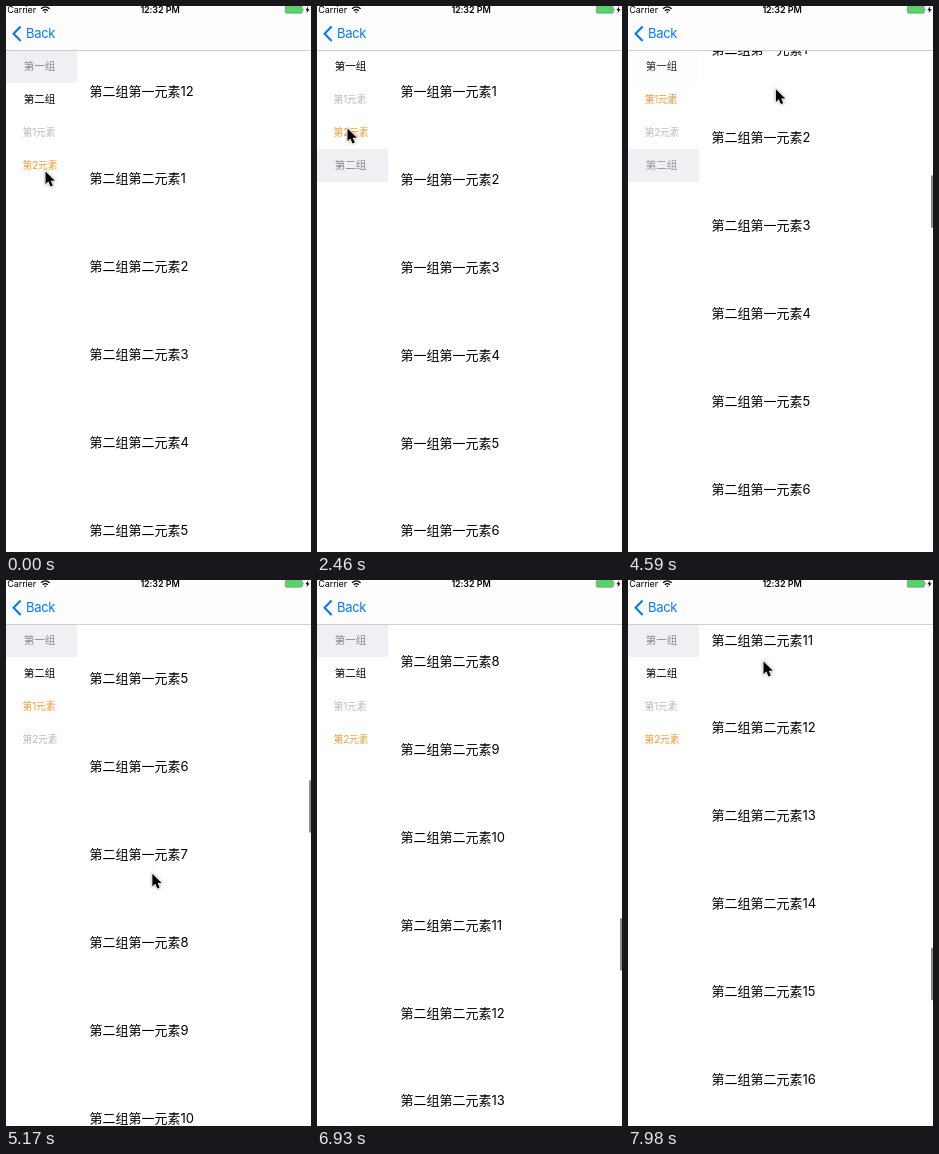
An HTML page for the animation above (8000 ms loop, 305 by 546 pixels).

```html
<!DOCTYPE html>
<html lang="zh">
<head>
<meta charset="utf-8">
<style>
html, body { margin: 0; width: 100%; height: 100%; overflow: hidden; background: #fff; }
svg { display: block; width: 305px; height: 546px; }
text { font-family: Inter, "Noto Sans CJK SC", "Noto Sans CJK", sans-serif; white-space: pre; }
#list text { font-size: 13px; }
#cursor { filter: drop-shadow(0 0.8px 0.8px rgba(0, 0, 0, 0.4)); }
</style>
</head>
<body>
<svg viewBox="0 0 305 546">
  <rect width="305" height="546" fill="#fff"/>
  <g id="list"></g>
  <rect id="bar" x="303" width="2" height="52.8" rx="1" fill="#8c8c8c"/>
  <g id="side"></g>

  <rect width="305" height="44" fill="#fdfdfd"/>
  <rect y="44" width="305" height="0.8" fill="#c4c4c6"/>
  <text x="1.3" y="7.2" font-size="9" letter-spacing="-0.1">Carrier</text>
  <g fill="none" stroke="#000" stroke-width="1.3">
    <path d="M35 2.8Q39.3-1 43.6 2.8M36.8 4.8Q39.3 2.5 41.8 4.8"/>
    <path d="M37.9 5.7h2.8L39.3 7.3z" fill="#000" stroke="none"/>
  </g>
  <text x="154" y="7.2" font-size="9" font-weight="600" text-anchor="middle" letter-spacing="-0.1">12:32 PM</text>
  <rect x="279.3" y="0.2" width="17" height="7" rx="1.3" fill="#4cd964" stroke="#777" stroke-width="0.6"/>
  <path d="M297.2 2.4q1.2 1.3 0 2.6z" fill="#555"/>
  <path d="M302.4 0.2L299.4 4.2H301.2L300.5 7.2L303.6 3.2H301.7z"/>
  <path d="M14.6 20.6L7.6 27.8L14.6 35" fill="none" stroke="#007aff" stroke-width="2.1"/>
  <text x="20" y="32.4" font-size="13" letter-spacing="-0.3" fill="#007aff">Back</text>

  <g id="cursor">
    <path d="M0.5 1.5V14.3L3.4 11.6L5.5 16.4L7.8 15.5L5.8 10.8H9.8Z" stroke="#fff" stroke-width="1.4" paint-order="stroke"/>
  </g>
</svg>
<script>
const LOOP = 8000, STEP = 1000 / 8.5, LEAD = 20;
const ROW = 87.84, TOP = 44, SLOT = 33;
const SECTIONS = [['第一组第一元素', 6], ['第一组第二元素', 7], ['第二组第一元素', 12], ['第二组第二元素', 30]];

// Times of the clicks and of the two flicks
const CLICK = [1280, 2400];
const FLICK = [{ down: 4000, up: 4240 }, { down: 6118, up: 6460 }];

// Pointer moves: start, end, x, y
const HOME = [39, 164];
const MOVES = [
  [240, 1058, 28, 63],
  [1500, 2240, 30, 121],
  [2950, 3530, 146, 184],
  [FLICK[0].down, FLICK[0].up, 148, 0],
  [4360, 5500, 145, 408],
  [5800, FLICK[1].down, 126, 391],
  [FLICK[1].down, FLICK[1].up, 132, 60],
  [FLICK[1].up, 6900, 150, 560],
  [7170, LOOP, 135, 80]
];

const $ = id => document.getElementById(id);
const lerp = (a, b, p) => a + (b - a) * p;
const progress = (t, start, length) => Math.min(1, Math.max(0, (t - start) / length));
const easeOut = p => 1 - (1 - p) ** 1.5;
const glide = (from, to, age, tau) => lerp(to, from, Math.exp(-age / tau));

function add(parent, tag, attrs, content = '') {
  const node = document.createElementNS('http://www.w3.org/2000/svg', tag);
  for (const key in attrs) node.setAttribute(key, attrs[key]);
  node.textContent = content;
  return parent.appendChild(node);
}

function pointerAt(t) {
  return MOVES.reduce(([px, py], [start, end, x, y]) => {
    const p = progress(t, start, end - start);
    return [lerp(px, x, p), lerp(py, y, p)];
  }, HOME);
}

// Clicks scroll to a section; flicks follow the pointer, then coast
function scrollAt(t, y) {
  const [a, b] = FLICK;
  if (t < CLICK[0]) return ROW * lerp(24.03, 25, progress(t, 0, STEP));
  if (t < a.down) return ROW * 6 * easeOut(progress(t, CLICK[1] + 70, 236));
  if (t < a.up) return ROW * 6 + 184 - y;
  if (t < b.down) return glide(711, 1592, t - a.up, 450);
  if (t < b.up) return 1578.4 + 391 - y;
  return glide(1909.4, 3115.9, t - b.up, 345);
}

// Section and index within it for a list row
function locate(row) {
  let s = 0;
  while (s < SECTIONS.length - 1 && row >= SECTIONS[s][1]) row -= SECTIONS[s++][1];
  return [s, row];
}

function sectionAt(t, offset) {
  if (t < CLICK[0]) return 3;
  if (t < CLICK[1]) return 0;
  if (t < FLICK[0].down) return 1;
  return locate(Math.floor(offset / ROW))[0];
}

const rows = Array.from({ length: 8 }, () => add($('list'), 'text', { x: 83.4 }));

// One sidebar layout per open group
const menus = [0, 1].map(open => {
  const g = add($('side'), 'g', {});
  const slot = n => TOP + SLOT * n;
  const closed = open ? 0 : 3;
  add(g, 'rect', { y: slot(closed), width: 71, height: SLOT, fill: '#efeff4' });
  ['第一组', '第二组'].forEach((name, i) => {
    const isOpen = i === open;
    add(g, 'text', {
      x: 17.7, y: slot(isOpen ? open : closed) + 20.4, 'font-size': 10.57, fill: isOpen ? '#000' : '#8a8a8d'
    }, name);
  });
  const items = [1, 2].map(n =>
    add(g, 'text', { x: 16.4, y: slot(open + n) + 20.2, 'font-size': 9.76 }, `第${n}元素`));
  return { g, items };
});

function draw(t) {
  const [x, y] = pointerAt(t);
  const offset = scrollAt(t, y);
  const first = Math.floor(offset / ROW);
  rows.forEach((node, i) => {
    const [s, index] = locate(first + i);
    node.textContent = SECTIONS[s][0] + (index + 1);
    node.setAttribute('y', TOP + (first + i + 0.5) * ROW - offset + 4.3);
  });

  $('bar').setAttribute('y', 46.5 + offset * 0.1035);
  $('bar').setAttribute('opacity', t > FLICK[0].down + 1 ? 1 : 0);

  const active = sectionAt(t, offset) % 2;
  const mix = 1 - progress(t, CLICK[0] - 30, 250) + progress(t, 4560, 250);
  menus.forEach(({ g, items }, open) => {
    g.setAttribute('opacity', open ? mix : 1 - mix);
    items.forEach((node, i) => node.setAttribute('fill', i === active ? '#f99a2e' : '#bababa'));
  });

  $('cursor').setAttribute('transform', `translate(${x} ${y})`);
}

// The screen advances at 8.5 steps per second
function frame() {
  const t = performance.now() % LOOP;
  draw(Math.floor((t + LEAD) / STEP) * STEP);
  requestAnimationFrame(frame);
}
frame();
</script>
</body>
</html>
```
